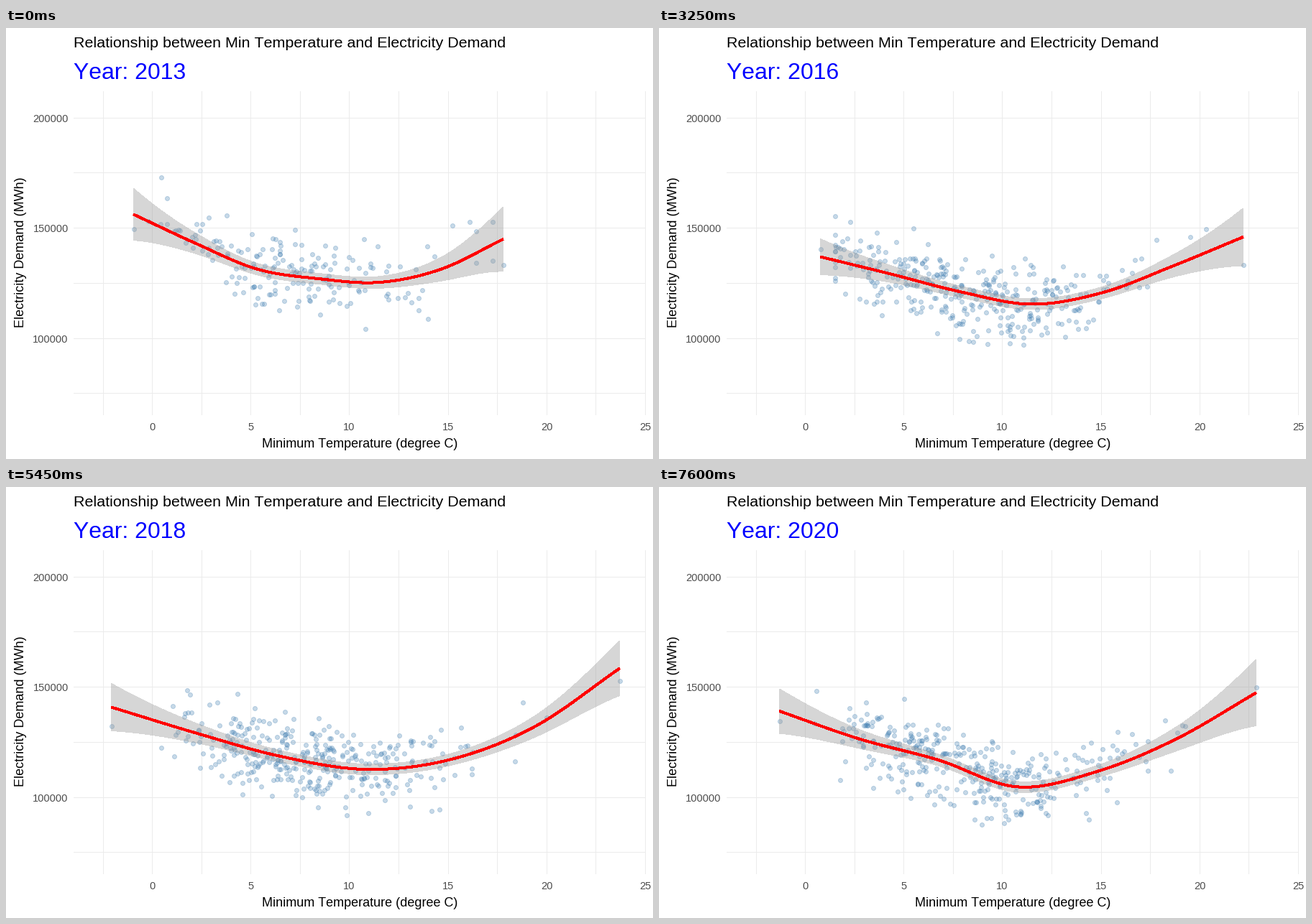
A matplotlib script for the animation above (8000 ms loop, 900 by 600 pixels).

```python
import numpy as np
import matplotlib.pyplot as plt
from matplotlib.animation import FuncAnimation
from matplotlib.patches import Polygon

W, H, DPI = 900, 600, 100
STEP_MS, FRAMES, STEPS = 50, 160, 7
STARTS = [*range(15, 126, 22), 146]   # first frame of each transition
LEFT, RIGHT, TOP, BOTTOM = 94, 890, 88, 539
ROWS = 80
PT = 72 / DPI

# Per year: cold and hot end, ribbon half width there, curve heights (px)
FITS = {
    2013: ((177, 691), (36, 45), (259, 299, 335, 348.5, 353.5, 335, 293.5)),
    2014: ((146, 835), (36, 44), (307, 329, 351, 368, 358, 318, 268)),
    2015: ((130, 854), (41, 48), (312.5, 322.5, 351, 377, 356.5, 314.5, 270)),
    2016: ((224, 812), (25, 40), (318, 342, 367, 384, 368, 331, 290.5)),
    2017: ((159, 848), (26, 42), (342.5, 341, 374, 401, 380, 335, 280.5)),
    2018: ((146, 853), (33, 38), (306, 342, 374.5, 392.5, 379, 333, 252)),
    2019: ((200, 783), (27, 30), (324, 349.5, 376.5, 400.5, 395, 336, 239)),
    2020: ((167, 830), (31, 46), (311.5, 350, 379.5, 417, 395.5, 350, 286)),
}

plt.rcParams["font.family"] = "Liberation Sans"
plt.rcParams["text.kerning_factor"] = 6

rng = np.random.default_rng(7)


def smooth(knots):
    """Cubic Hermite curve through evenly spaced knots."""
    y = np.asarray(knots, float)
    m = np.gradient(y)
    s = np.linspace(0, len(y) - 1, ROWS)
    i = np.minimum(s.astype(int), len(y) - 2)
    t = s - i
    return ((2 * t**3 - 3 * t**2 + 1) * y[i] + (t**3 - 2 * t**2 + t) * m[i]
            + (3 * t**2 - 2 * t**3) * y[i + 1] + (t**3 - t**2) * m[i + 1])


def band(left, right, mid=7.5):
    """Half width of the confidence ribbon along the curve."""
    u = np.linspace(-1, 1, ROWS)
    return mid + np.where(u < 0, left - mid, right - mid) * np.abs(u) ** 3.5


def daily_points(year, ends, cx, cy):
    """Warm summers with a hot tail; less demand at weekends."""
    first = 181 if year == 2013 else 0
    day = np.arange(first, 366 if year % 4 == 0 else 365)
    n = len(day)
    season = np.cos(2 * np.pi * (day - 25) / 365)
    heat = rng.exponential(33 + 24 * season)
    x = np.clip(418 + 88 * season + rng.normal(0, 58, n) + heat - 16,
                ends[0] + 20, ends[1] - 15)
    x[x.argmin()], x[x.argmax()] = ends

    weekend = (day + year) % 7 < 2
    off = np.where(weekend, rng.normal(32, 17, n), rng.normal(-14, 20, n))
    return np.column_stack([x, np.interp(x, cx, cy) + np.clip(off, -72, 66)])


def build(year):
    ends, widths, knots = FITS[year]
    cx, cy = np.linspace(*ends, ROWS), smooth(knots)
    return dict(year=year, pts=daily_points(year, ends, cx, cy),
                curve=np.column_stack([cx, cy, band(*widths)]))


years = [build(year) for year in FITS]

fig = plt.figure(figsize=(W / DPI, H / DPI), dpi=DPI, facecolor="white")
ax = fig.add_axes([0, 0, 1, 1])
ax.set_xlim(0, W)
ax.set_ylim(H, 0)
ax.axis("off")


def label(x, y, text, size, color="black", **kw):
    return ax.text(x, y, text, fontsize=size * PT, color=color, va="baseline", **kw)


def px(deg):
    return np.floor(203.7 + 27.42 * deg) + 0.5


def py(mwh):
    return np.floor(432.2 - (mwh - 100000) * 0.00307) + 0.5


grid = dict(color="#EBEBEB", lw=PT, zorder=0, solid_capstyle="butt", snap=False)
for deg in np.arange(-2.5, 25.1, 2.5):
    ax.plot([px(deg)] * 2, [TOP, BOTTOM], **grid)
for mwh in range(75000, 200001, 25000):
    ax.plot([LEFT, RIGHT], [py(mwh)] * 2, **grid)
for deg in range(0, 26, 5):
    label(px(deg), 559.5, str(deg), 14.6, "#4D4D4D", ha="center")
for mwh in (100000, 150000, 200000):
    label(86.7, py(mwh) + 5.5, str(mwh), 14.6, "#4D4D4D", ha="right")

label(94, 27, "Relationship between Min Temperature and Electricity Demand", 21.45)
label(492, 584, "Minimum Temperature (degree C)", 18, ha="center")
label(25, 312.5, "Electricity Demand (MWh)", 18, ha="center",
      rotation=90, rotation_mode="anchor")
heading = label(94, 71, "", 32, "#0000FF")

blue = (70 / 255, 130 / 255, 180 / 255, 0.3)
dots = ax.scatter([], [], s=(6 * PT) ** 2, facecolors=[blue], edgecolors=[blue],
                  linewidths=PT, zorder=2)
ribbon = ax.add_patch(Polygon(np.zeros((3, 2)), closed=True, lw=0, antialiased=False,
                              fc=(0.6, 0.6, 0.6, 0.4), zorder=3))
line, = ax.plot([], [], color="#FF0000", lw=3 * PT, zorder=4,
                solid_capstyle="butt", antialiased=False)


def draw(frame):
    i = sum(s <= frame for s in STARTS)
    t = min(frame - STARTS[i - 1] + 1, STEPS) / STEPS if i else 1
    b = years[i]
    a = years[i - 1] if i else b

    # Days without a partner appear only when the new year has settled.
    if t == 1:
        pts = b["pts"]
    else:
        n = min(len(a["pts"]), len(b["pts"]))
        pts = (1 - t) * a["pts"][:n] + t * b["pts"][:n]
    x, y, w = ((1 - t) * a["curve"] + t * b["curve"]).T

    dots.set_offsets(pts + 0.5)
    line.set_data(x + 0.5, y + 0.5)
    ribbon.set_xy(np.column_stack([np.r_[x, x[::-1]],
                                   np.r_[y - w, (y + w)[::-1]]]) + 0.5)
    heading.set_text(f"Year: {(b if t > 0.5 else a)['year']}")
    return dots, ribbon, line, heading


anim = FuncAnimation(fig, draw, frames=FRAMES, interval=STEP_MS,
                     init_func=lambda: draw(0), repeat=True, repeat_delay=0)
plt.show()
```
